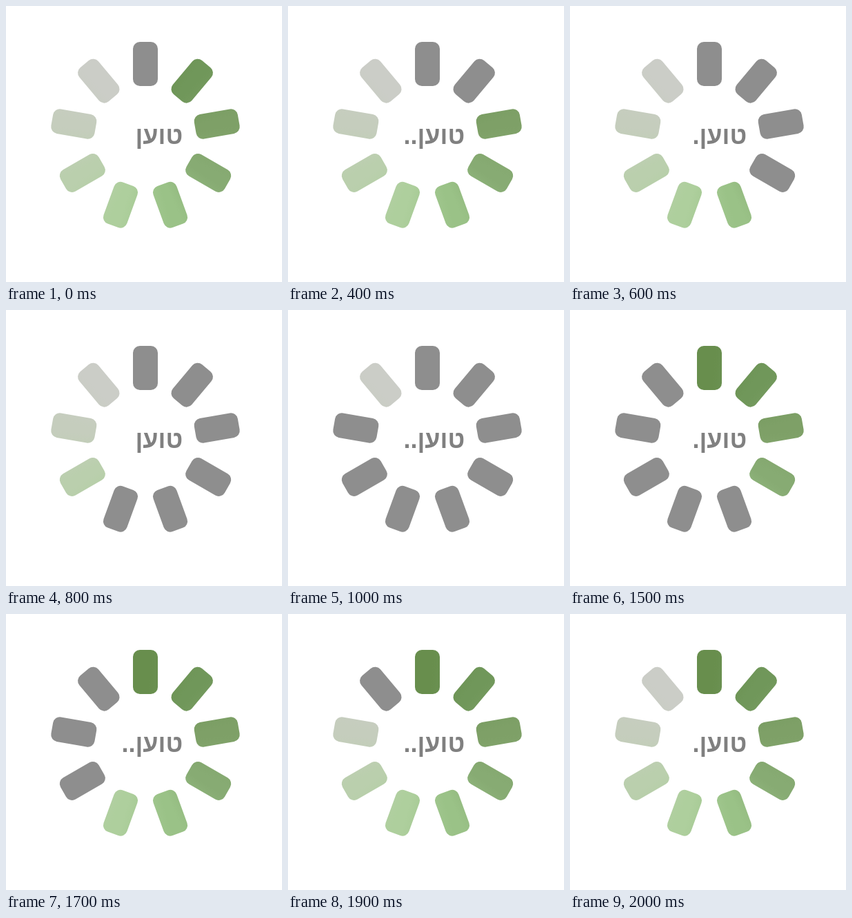
Write an HTML page with a canvas that moves like this. It is 400 px wide and 400 px high and loops after 2.1 s.

```html
<!DOCTYPE html>
<html lang="he">
<head>
<meta charset="utf-8">
<style>
  html, body { margin: 0; width: 100%; height: 100%; overflow: hidden; background: #fff; }
  canvas { display: block; }
</style>
</head>
<body>
<canvas id="stage" width="400" height="400"></canvas>
<script>
const ctx = document.getElementById('stage').getContext('2d');
const LOOP = 2100, TICK = 100;
const CX = 202, CY = 189.3, RADIUS = 105.3, BARS = 9;
const STEP = 2 * Math.PI / BARS;
const GREY = '#8e8e8e';
const COLORS = ['#688e4d', '#70975a', '#7ea067', '#87ab73', '#9ac287',
                '#aecf9d', '#bacfad', '#c5cdbd', '#cbcdc7'];
// Number of dots after the word, one digit per tick
const DOTS = '001120120120020112221';

// Hue sweep around the ring, with the seam between the last bar and the top one
const sweep = ctx.createConicGradient(-Math.PI / 2 - STEP / 2, CX, CY);
COLORS.forEach((color, i) => {
  sweep.addColorStop((i + 0.42) / BARS, color);
  sweep.addColorStop((i + 0.58) / BARS, color);
});

function isGrey(bar, tick) {
  const greyAt = bar ? bar + 3 : 0;
  const greenAt = bar ? bar + 12 : 11;
  return tick >= greyAt && tick < greenAt;
}

function drawBar(bar, tick) {
  const m = new DOMMatrix()
    .translate(CX, CY)
    .rotate(bar * 360 / BARS)
    .translate(0, -RADIUS);
  const box = new Path2D();
  box.roundRect(-18, -32, 36, 64, 10);
  const path = new Path2D();
  path.addPath(box, m);
  ctx.fillStyle = isGrey(bar, tick) ? GREY : sweep;
  ctx.fill(path);
}

function drawLabel(tick) {
  const x = 187.5, y = 200;
  ctx.font = 'bold 36px "Liberation Sans", Arial, sans-serif';
  ctx.direction = 'rtl';
  ctx.fillStyle = '#808080';
  ctx.textAlign = 'left';
  ctx.fillText('טוען', x, y);
  ctx.textAlign = 'right';
  ctx.fillText('.'.repeat(+DOTS[tick]), x, y);
}

function draw() {
  const tick = Math.floor(performance.now() % LOOP / TICK);
  ctx.fillStyle = '#fff';
  ctx.fillRect(0, 0, 400, 400);
  for (let bar = 0; bar < BARS; bar++) drawBar(bar, tick);
  drawLabel(tick);
  requestAnimationFrame(draw);
}
draw();
</script>
</body>
</html>
```
